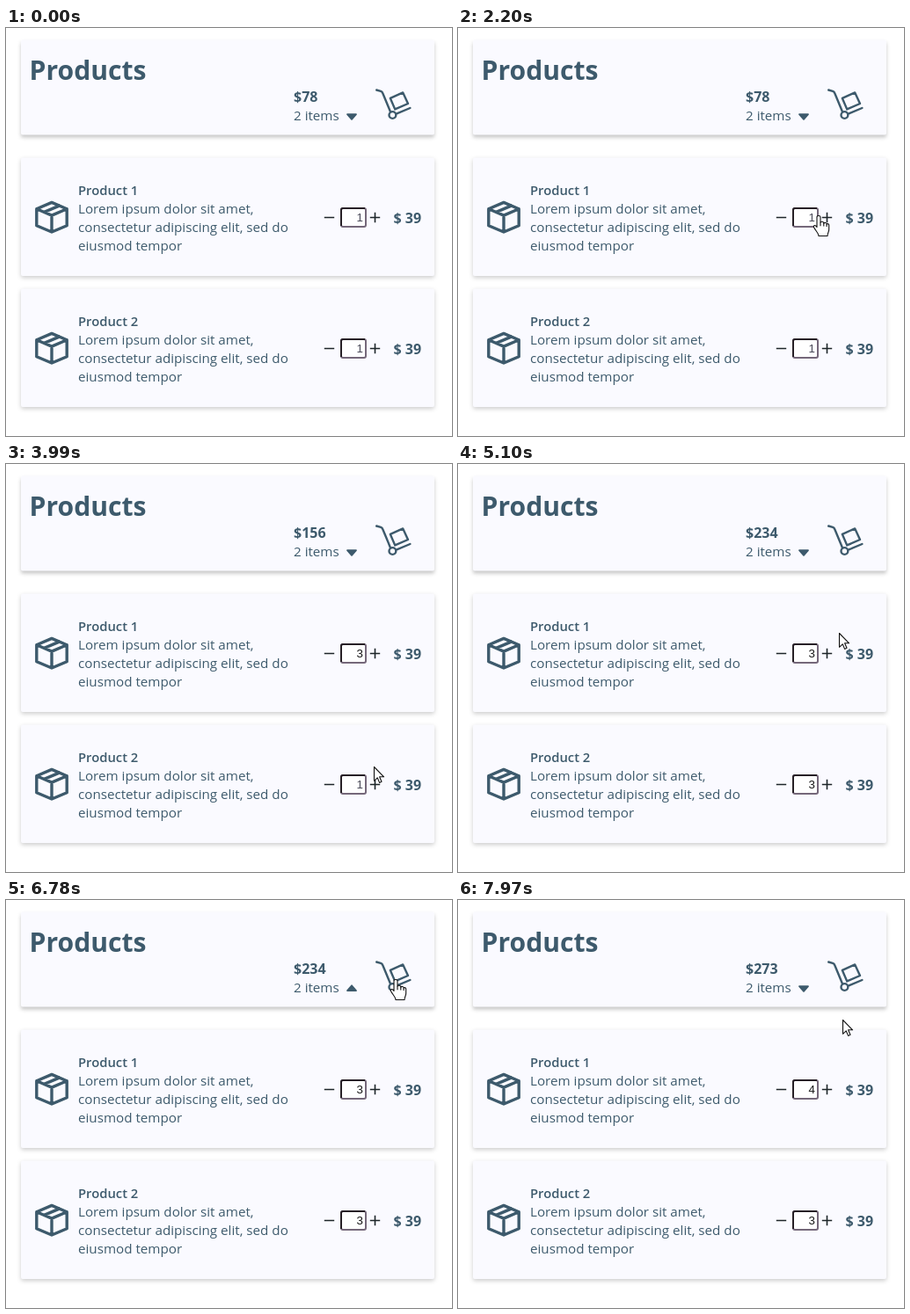
Write an HTML page that moves like this. It is 507 by 464 pixels and loops after 8000 ms.

```html
<!DOCTYPE html>
<html lang="en">
<head>
<meta charset="utf-8">
<title>Products</title>
<style>
  html, body { margin: 0; width: 100%; height: 100%; overflow: hidden; background: #fff; }
  svg { display: block; width: 507px; height: 464px; }
  text { font: 15.2px "Open Sans", "Noto Sans", sans-serif; fill: #3d5a6c; white-space: pre; }
  .title { font-size: 30.1px; font-weight: 700; }
  .name { font-size: 14.8px; font-weight: 600; }
  .price { font-size: 16px; font-weight: 700; }
  .qty { font: 13.33px "Liberation Sans", Arial, sans-serif; text-anchor: end; }
  .card { fill: #fafaff; filter: drop-shadow(0 2px 2.5px rgba(0, 0, 0, .2)); }
  .head { fill: #fafaff; filter: drop-shadow(0 3px 2.2px rgba(0, 0, 0, .22)); }
  .pop { fill: #b1d4dd; filter: drop-shadow(0 2px 2.5px rgba(0, 0, 0, .24)); }
  .icon { fill: none; stroke: #3d5a6c; stroke-linejoin: round; stroke-linecap: round; }
  .sign { fill: none; stroke: #1d2528; stroke-width: 1.6; }
  .cursor { fill: #fff; stroke: #111; stroke-width: 1.1; stroke-linejoin: round; }
</style>
</head>
<body>
<svg id="stage" viewBox="0 0 507 464"></svg>
<script>
const LOOP = 8000, PRICE = 39, TURN = 290;
const OPEN = 5520, CLOSE = 6780, ENTER = 700;

// times at which each product's plus button is pressed
const presses = [[2900, 3570, 7600], [4450, 4750]];

// cursor moves: start, end, target x, target y
const moves = [
  [700, 980, 474, 310],
  [1150, 1480, 452, 190],
  [1480, 1600, 450, 167],
  [1900, 2230, 410, 213],
  [2400, 2530, 420, 211],
  [3600, 3990, 418, 344],
  [3990, 4180, 420, 363],
  [4780, 5510, 440, 95],
  [6310, 6350, 443, 90],
  [6800, 7200, 434, 307],
  [7200, 7500, 416, 210],
  [7750, 7970, 437, 136]
];

// clickable areas: left, top, right, bottom
const hotspots = [
  [408, 203, 431, 228],
  [408, 352, 431, 377],
  [418, 68, 462, 107]
];

const text = (x, y, str, cls = '', id = '') =>
  `<text x="${x}" y="${y}" class="${cls}" id="${id}">${str}</text>`;

function productCard(n, dy) {
  return `<g transform="translate(0 ${dy})">
    <rect class="card" x="17" y="147.5" width="470" height="134.5" rx="2"/>
    <path class="icon" stroke-width="3.4" d="M52 198.4 69.2 205.7V224.7L52 232 34.8 224.7V205.7ZM34.8 205.7 52 213.1 69.2 205.7M52 213.1V232M43.4 209.4 60.6 202.1"/>
    ${text(82, 190, 'Product ' + n, 'name')}
    ${text(82, 211, 'Lorem ipsum dolor sit amet,')}
    ${text(82, 232, 'consectetur adipiscing elit, sed do')}
    ${text(82, 253, 'eiusmod tempor')}
    <path class="sign" d="M361.8 215.5H373.2M413.8 215.5H425.2M419.5 209.8V221.2"/>
    <rect x="381" y="205" width="28" height="21" rx="2" fill="#fff" stroke="#75687a" stroke-width="2"/>
    <path d="M381 225V207Q381 205 383 205H408" fill="none" stroke="#272026" stroke-width="2"/>
    ${text(406, 220, '1', 'qty', 'qty' + n)}
    ${text(440.5, 222, '$ ' + PRICE, 'price')}
  </g>`;
}

const popupRow = (n, dy) =>
  text(247, 163 + dy, 'Product ' + n, 'name') +
  text(247, 184 + dy, '$ ' + PRICE, 'price') +
  text(433, 174 + dy, '', 'name', 'line' + n);

document.getElementById('stage').innerHTML = `
  <rect class="head" x="17" y="13.5" width="470" height="108" rx="2"/>
  ${text(26.6, 59, 'Products', 'title')}
  ${text(327, 84, '', 'price', 'total')}
  ${text(327, 105, '2 items')}
  <path id="caret" d="M388 98.2H398L393 103.9Z" fill="#3d5a6c" stroke="#3d5a6c" stroke-width="1.8" stroke-linejoin="round"/>
  <g class="icon" stroke-width="2.4">
    <path d="M421.2 70.5 426 71.8Q427.6 72.3 428.2 74L437 95.2M436.8 79.8 451.2 73.4 457 86 442.2 92.4ZM443.6 97.6 459.4 91"/>
    <circle cx="439.4" cy="99" r="3.9"/>
  </g>
  ${productCard(1, 0)}
  ${productCard(2, 149)}
  <g id="popup">
    <path class="pop" d="M192 131H442L452 121 462 131H482Q487 131 487 136V271Q487 276 482 276H192Q187 276 187 271V136Q187 131 192 131Z"/>
    <path d="M187 203.5H487" stroke="#9abfca"/>
    ${popupRow(1, 0)}
    ${popupRow(2, 73)}
  </g>
  <g id="cursor" class="cursor">
    <path id="arrow" d="M.5 .5V16.3L4.2 12.8 6.6 18.4 9 17.3 6.6 11.8H11.6Z"/>
    <g id="hand">
      <path d="M-2 2C-2 -.1 2 -.1 2 2V8C3 6.8 5.7 7 5.8 9 6.8 8 9 8.3 9.1 10 10.2 9.2 11.7 9.8 11.7 11.5V16C11.7 19 10 20 10 23.5H0C0 21 -3 18 -5.3 14 -6.5 11.2 -4 10.4 -2 13.5Z"/>
      <path fill="none" d="M2 8V12.3M5.8 9V12.6M9.1 10V13"/>
    </g>
  </g>`;

const el = id => document.getElementById(id);
const show = (id, on) => el(id).setAttribute('visibility', on ? 'visible' : 'hidden');
const clamp = v => Math.max(0, Math.min(1, v));
const ease = v => v * v * (3 - 2 * v);
const glide = v => Math.sin(v * Math.PI / 2);

function cursorAt(t) {
  let x = 503, y = 460;
  for (const [start, end, tx, ty] of moves) {
    const k = glide(clamp((t - start) / (end - start)));
    x += (tx - x) * k;
    y += (ty - y) * k;
  }
  return [x, y];
}

function draw(t) {
  const counts = presses.map(list => 1 + list.filter(p => t >= p).length);
  counts.forEach((count, i) => {
    const box = el('qty' + (i + 1));
    box.textContent = count;
    box.style.fill = count > 1 ? '#161616' : '#4a4a58';
    el('line' + (i + 1)).textContent = 'Qty:' + count;
  });
  el('total').textContent = '$' + PRICE * (counts[0] + counts[1]);

  show('popup', t >= OPEN && t < CLOSE);
  const turn = ease(clamp((t - OPEN - 20) / TURN)) - ease(clamp((t - CLOSE - 20) / TURN));
  el('caret').setAttribute('transform', `rotate(${180 * turn} 393 100.6)`);

  const [x, y] = cursorAt(t);
  const over = hotspots.some(([l, top, r, b]) => x >= l && x <= r && y >= top && y <= b);
  // the plus button of the second product takes the hand only once the pointer is inside
  el('cursor').setAttribute('transform', `translate(${Math.round(x)} ${Math.round(y)})`);
  show('arrow', t >= ENTER && !over);
  show('hand', t >= ENTER && over);
}

function tick() {
  draw(performance.now() % LOOP);
  requestAnimationFrame(tick);
}
tick();
</script>
</body>
</html>
```
